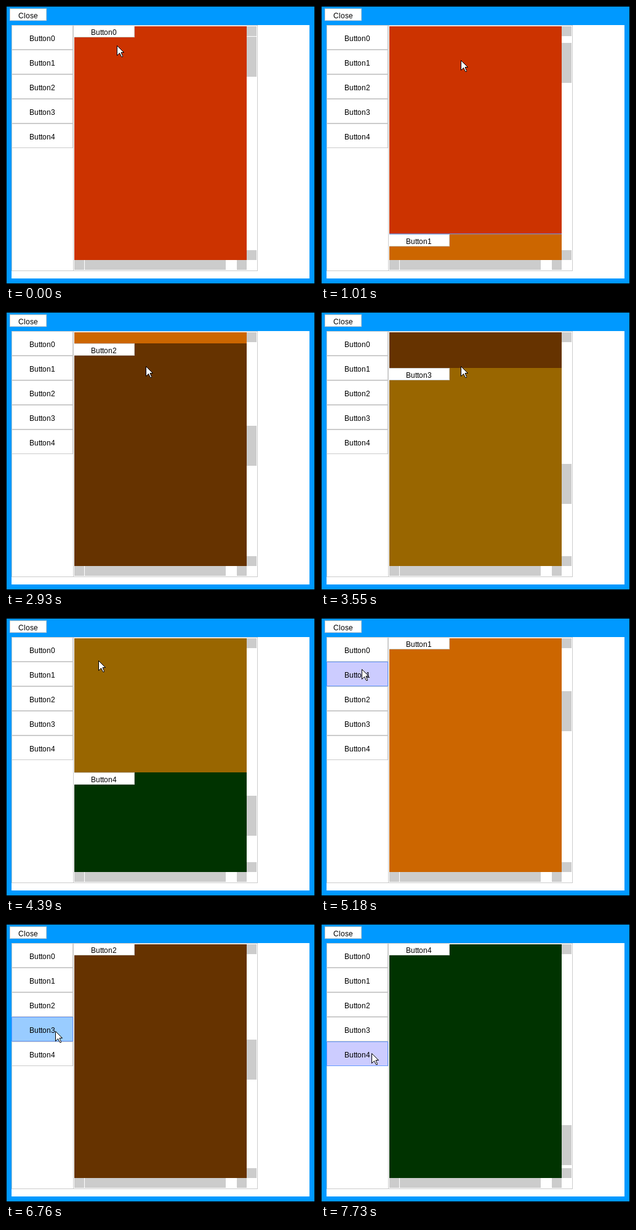
Animation, 502 px wide and 452 px high, one loop 8000 ms. Source, as an HTML page with a canvas:

```html
<!DOCTYPE html>
<html lang="en">
<head>
<meta charset="utf-8">
<title>Scrolling panels</title>
<style>
html, body { margin: 0; width: 100%; height: 100%; overflow: hidden; }
canvas { display: block; }
</style>
</head>
<body>
<canvas id="stage" width="502" height="452"></canvas>
<script>
const ctx = document.getElementById('stage').getContext('2d');
const LOOP = 8000, STEP = 60, HOLD = 120, PANEL = 400;
const GREY = '#ccc', BLUE = '#69f';
const panels = ['#c30', '#c60', '#630', '#960', '#030'];

// Pointer moves: start time, number of steps, end x, end y
const moves = [
  [470, 4, 84, 52], [710, 5, 227, 88], [4210, 8, 72, 50], [5000, 3, 66, 83],
  [5610, 3, 70, 128], [6400, 5, 80, 174], [7310, 3, 82, 210]
];
// Bursts of the wheel: start time, number of notches
const bursts = [
  [1010, 1], [1820, 1], [2070, 2], [2500, 3],
  [2870, 2], [3180, 2], [3550, 1], [3730, 2]
];
// Presses on Button1 to Button4, in order
const presses = [5060, 6100, 6760, 7610];

const stepsDone = (t, start, n) =>
  Math.max(0, Math.min(n, Math.floor((t - start) / STEP) + 1));

function pointerAt(t) {
  let x = 180, y = 64;
  for (const [start, n, endX, endY] of moves) {
    const k = stepsDone(t, start, n) / n;
    x += (endX - x) * k;
    y += (endY - y) * k;
  }
  return [Math.round(x), Math.round(y)];
}

// A click jumps to its panel; before that the wheel scrolls, twice as fast after five notches.
function scrollAt(t) {
  const clicks = presses.filter(p => t >= p + HOLD).length;
  if (clicks) return clicks * PANEL;
  const notches = bursts.reduce((sum, [start, n]) => sum + stepsDone(t, start, n), 0);
  return 60 * (notches + Math.max(0, notches - 5));
}

function fill(color, x, y, w, h) {
  ctx.fillStyle = color;
  ctx.fillRect(x, y, w, h);
}

function frame(color, x, y, w, h) {
  ctx.strokeStyle = color;
  ctx.strokeRect(x + .5, y + .5, w - 1, h - 1);
}

// Centred text with each letter on a whole pixel
function text(label, centre, baseline) {
  const widths = [...label].map(c => Math.round(ctx.measureText(c).width));
  let x = Math.round(centre - widths.reduce((a, b) => a + b) / 2);
  ctx.fillStyle = '#000';
  widths.forEach((w, i) => {
    ctx.fillText(label[i], x, baseline);
    x += w;
  });
}

function button(label, x, y, w, h, back = '#fff', edge = GREY) {
  fill(back, x, y, w, h);
  frame(edge, x, y, w, h);
  text(label, x + w / 2, y + h / 2 + 6);
}

function drawPanels(scroll) {
  ctx.save();
  ctx.beginPath();
  ctx.rect(111, 33, 280, 380);
  ctx.clip();
  panels.forEach((color, i) => {
    const y = 31 + PANEL * i - scroll;
    fill(color, 109, y, 300, PANEL);
    if (i === 0) fill(BLUE, 109, y + PANEL - 1, 300, 1);
    button('Button' + i, 109, y, 100, 20);
  });
  ctx.restore();
}

function drawBars(scroll) {
  fill(GREY, 391, 33, 16, 16);
  fill(GREY, 391, Math.round(50 + scroll * .173), 16, 65);
  fill(GREY, 391, 397, 16, 16);
  fill(GREY, 111, 413, 16, 16);
  fill(GREY, 128, 413, 229, 16);
  fill(GREY, 375, 413, 16, 16);
}

const arrow = new Path2D('M.5 .5V16.5L4.5 12.5L7.5 18.5H9.5V17.5L7 11.5H11.5Z');

function drawPointer(x, y) {
  ctx.save();
  ctx.translate(x, y);
  ctx.fillStyle = '#fff';
  ctx.fill(arrow);
  ctx.strokeStyle = '#000';
  ctx.stroke(arrow);
  ctx.restore();
}

function draw(t) {
  const [x, y] = pointerAt(t);
  const scroll = scrollAt(t);
  const hovered = x >= 9 && x < 109 ? Math.floor((y - 31) / 40) : -1;
  const pressed = presses.some(p => t >= p && t < p + HOLD);

  ctx.font = '12px "Liberation Sans", Arial, sans-serif';
  ctx.lineWidth = 1;

  fill('#09f', 0, 0, 502, 452);
  frame('#000', 0, 0, 502, 452);
  button('Close', 6, 4, 60, 20);
  fill('#fff', 9, 31, 484, 412);
  frame(GREY, 9, 31, 400, 400);
  frame(GREY, 109, 31, 300, 400);

  drawPanels(scroll);
  drawBars(scroll);
  panels.forEach((_, i) => {
    const over = i === hovered;
    const back = !over ? '#fff' : pressed ? '#9cf' : '#ccf';
    button('Button' + i, 9, 31 + 40 * i, 100, 40, back, over ? BLUE : GREY);
  });
  drawPointer(x, y);
}

const begin = performance.now();
function tick() {
  draw((performance.now() - begin) % LOOP);
  requestAnimationFrame(tick);
}
tick();
</script>
</body>
</html>
```
